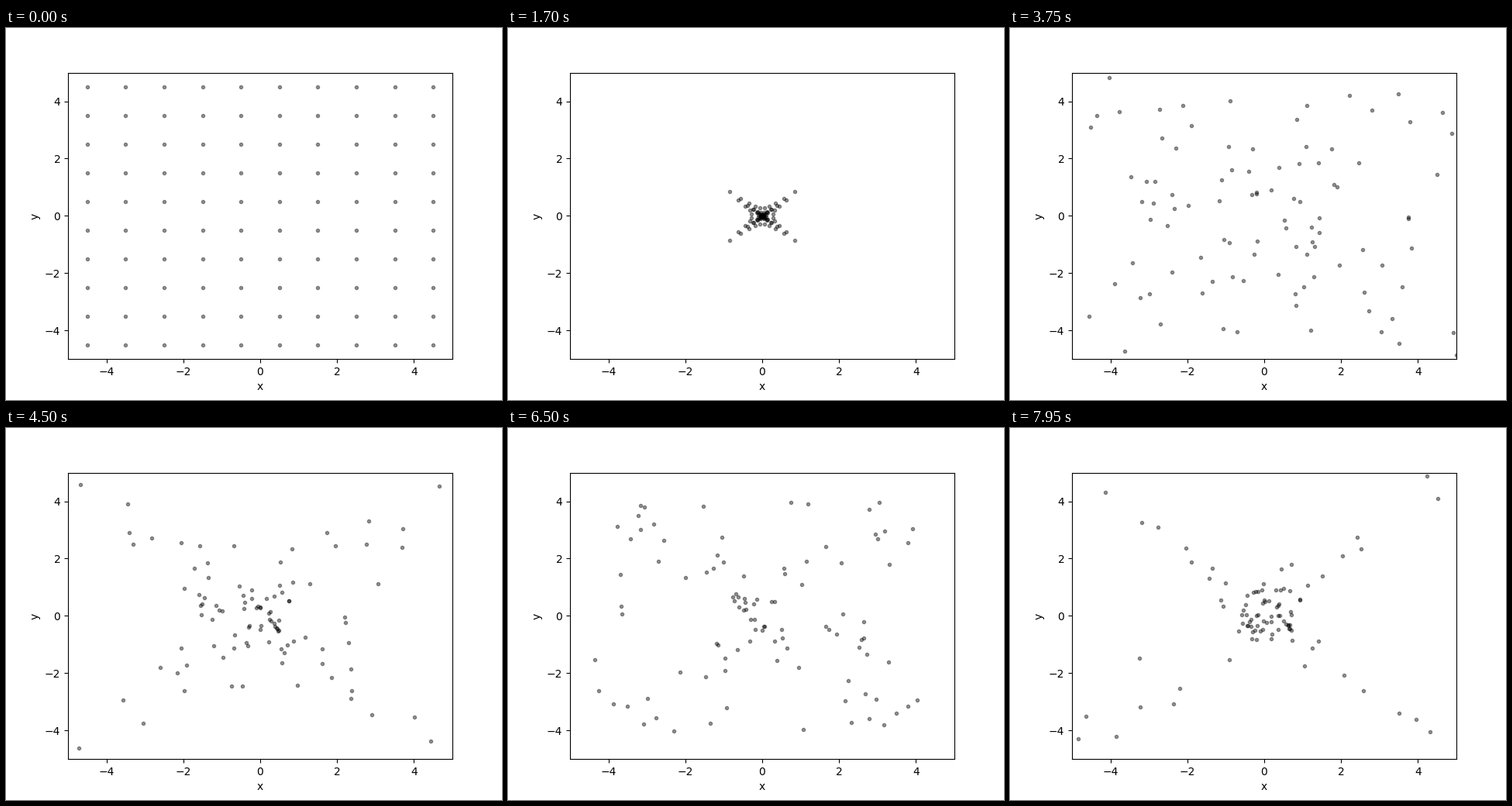
A matplotlib script for the animation above (8000 ms loop, 640 by 480 pixels).

```python
import numpy as np
import matplotlib.pyplot as plt
from matplotlib.animation import FuncAnimation

FRAMES = 160
INTERVAL = 50
SUBSTEPS = 4
PULL = 1e-4          # attraction of each pair, per frame squared
SCATTER_FRAME = 35   # the cloud passes through its centre


def acceleration(pos):
    """Every particle pulls every other with the same strength at any distance."""
    gap = pos[None, :, :] - pos[:, None, :]
    dist = np.sqrt((gap ** 2).sum(axis=2) + 1e-6)
    return PULL * (gap / dist[:, :, None]).sum(axis=1)


def scatter(vel, start, rng):
    """Close encounters: slow and deflect all but the late, outermost particles."""
    radius = np.hypot(start[:, 0], start[:, 1])
    share = np.exp(-(radius / 5) ** 4)
    keep = 1 - 0.3 * share * rng.random(len(start))
    angle = rng.uniform(0, 2 * np.pi, len(start))
    size = 0.005 + 0.065 * share
    kick = size[:, None] * np.column_stack([np.cos(angle), np.sin(angle)])
    new = vel * keep[:, None] + kick
    return new - new.mean(axis=0)


def simulate():
    rng = np.random.default_rng(7)
    side = np.arange(-4.5, 5)
    start = np.array([(x, y) for y in side for x in side])
    pos, vel = start.copy(), np.zeros_like(start)
    dt = 1 / SUBSTEPS
    acc = acceleration(pos)
    path = [start]
    for frame in range(1, FRAMES):
        if frame == SCATTER_FRAME:
            vel = scatter(vel, start, rng)
        for _ in range(SUBSTEPS):
            vel += acc * dt / 2
            pos += vel * dt
            acc = acceleration(pos)
            vel += acc * dt / 2
        path.append(pos.copy())
    return path


path = simulate()

fig, ax = plt.subplots(figsize=(6.4, 4.8), dpi=100)
ax.set_xlim(-5, 5)
ax.set_ylim(-5, 5)
ax.set_xlabel("x")
ax.set_ylabel("y")
dots, = ax.plot(path[0][:, 0], path[0][:, 1], "k.", alpha=0.4)


def update(frame):
    dots.set_data(path[frame][:, 0], path[frame][:, 1])
    return dots,


anim = FuncAnimation(fig, update, frames=FRAMES, interval=INTERVAL,
                     repeat=True, repeat_delay=0)
plt.show()
```
